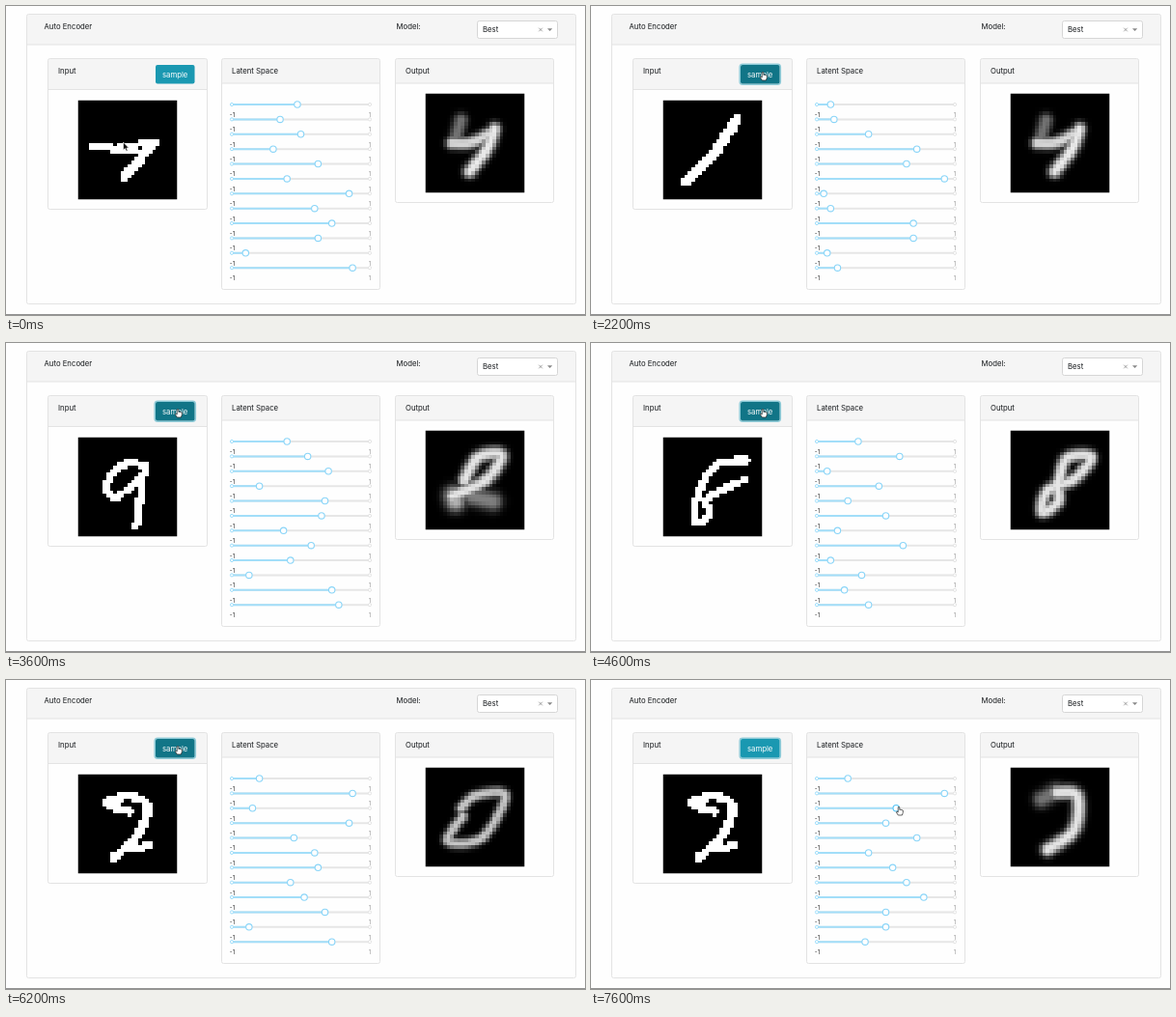
An HTML page with a canvas that plays this animation: 600 by 320 pixels, repeating every 8000 ms.

```html
<!DOCTYPE html>
<html lang="en">
<head>
<meta charset="utf-8">
<title>Auto Encoder</title>
<style>
  html, body { margin: 0; width: 100%; height: 100%; overflow: hidden; background: #fefefe; }
  svg { position: absolute; left: 0; top: 0; }
  canvas { position: absolute; left: 0; top: 0; width: 102.5px; height: 102.5px; image-rendering: pixelated; }
  #input { transform: translate(74.5px, 97.5px); }
  #output { transform: translate(434.5px, 90.5px); }
  text { font: 7.75px Inter, "Liberation Sans", sans-serif; fill: #15181b; }
  .mark { font-size: 6.2px; text-anchor: middle; fill: #333; }
</style>
</head>
<body>
<svg id="page" width="600" height="320"></svg>
<canvas id="input" width="28" height="28"></canvas>
<canvas id="output" width="28" height="28"></canvas>
<svg id="pointer" width="600" height="320"></svg>
<script>
const LOOP = 8000, TICK = 200, SIZE = 28;
const RAIL = { left: 234, width: 143, top: 102, gap: 15.38, count: 12, steps: 40 };
const BORDER = '#e3e3e3', BLUE = '#96dbfa';
const $ = id => document.getElementById(id);

function add(parent, tag, attrs, text) {
  const node = document.createElementNS('http://www.w3.org/2000/svg', tag);
  for (const key in attrs) node.setAttribute(key, attrs[key]);
  if (text) node.textContent = text;
  return parent.appendChild(node);
}

// Smooth curve through a few key points given as x, y pairs in cells.
function stroke(width, light, ...xy) {
  const keys = [];
  for (let i = 0; i < xy.length; i += 2) keys.push([xy[i], xy[i + 1]]);
  const key = i => keys[Math.max(0, Math.min(keys.length - 1, i))];
  const points = [];
  for (let u = 0; u <= keys.length - 1; u += 1 / 16) {
    const i = Math.floor(u), f = u - i;
    points.push([0, 1].map(axis => {
      const [a, b, c, d] = [-1, 0, 1, 2].map(k => key(i + k)[axis]);
      return b + f / 2 * (c - a + f * (2 * a - 5 * b + 4 * c - d + f * (3 * (b - c) + d - a)));
    }));
  }
  return { width, light, points };
}

const drawn = {
  seven: [stroke(1.05, 1, 4, 13, 9, 13), stroke(1.05, 1, 10, 14, 16, 14),
    stroke(1.05, 1, 12, 13, 22, 12), stroke(1.4, 1, 20.5, 13, 17, 17.3, 13.1, 21.8)],
  one: [stroke(1.5, .95, 20.8, 5.4, 14, 15.4, 6.6, 22.6)],
  nine: [stroke(1.05, .9, 18.5, 8, 13.5, 7.3, 7.8, 13.5, 11, 16.6, 18.3, 11),
    stroke(1.1, .9, 18.8, 8, 17.8, 16, 16.4, 25)],
  eight: [stroke(1.1, 1, 24, 6.5, 15, 7.7, 10, 16, 9.2, 23.7, 12.8, 22, 12, 17.5),
    stroke(1.1, 1, 23, 12, 12.5, 17)],
  two: [stroke(1.25, 1, 14.5, 10.5, 8.4, 8.3, 14, 6.1, 19.5, 9, 17, 17, 10, 23.6),
    stroke(1.05, 1, 10, 23.5, 13, 21.5, 20, 20.3)]
};

const decoded = {
  seven: [stroke(1.6, .45, 10, 7.5, 8.5, 13), stroke(1.4, .85, 7.5, 14, 13, 13.8, 19.5, 10.5),
    stroke(1.5, .92, 19.5, 10, 17.5, 15.5, 12.5, 22)],
  wideTwo: [stroke(1.5, .9, 11, 14, 15, 7.5, 21.5, 7, 17, 14, 7.5, 18.5),
    stroke(2.6, .7, 8, 18.5, 8.5, 20), stroke(2.4, .5, 13, 18.5, 19, 20)],
  eight: [stroke(1.4, .9, 13.5, 15, 16, 7.8, 22.8, 7.5, 18, 13.7, 10.5, 17, 9, 23, 13.5, 20, 13, 15)],
  zero: [stroke(1.1, .78, 10, 11.5, 14.5, 7.8, 22.5, 8, 16, 19.8, 6.3, 20.8, 10.5, 13.8)],
  two: [stroke(1.6, .9, 13, 7, 18.8, 8, 18, 17.5, 10.5, 23.2), stroke(2.1, .45, 8.8, 9, 13, 6.7)]
};

// Knob settings in rail steps; any other digit gets a seeded random row.
const settings = {
  seven: [19, 14, 20, 12, 25, 16, 34, 24, 29, 25, 4, 35],
  one: [4, 5, 15, 29, 26, 37, 2, 4, 28, 28, 3, 6],
  wideTwo: [16, 22, 28, 8, 27, 26, 15, 23, 17, 5, 29, 31],
  eight: [12, 24, 3, 18, 9, 20, 6, 25, 4, 13, 8, 15],
  zero: [8, 35, 6, 34, 18, 24, 25, 17, 21, 27, 5, 29],
  two: [9, 37, 23, 20, 29, 15, 22, 26, 31, 20, 20, 14]
};
const randomStep = i => 4 + Math.floor(32 * Math.abs(Math.sin(78.233 * (i + 1))));
const knobStep = (name, i) => settings[name] ? settings[name][i] : randomStep(i);

// The sliders follow each new input after the lag, the output after twice the lag.
const samples = [
  { start: 0, name: 'seven', lag: 0 }, { start: 2000, name: 'one', lag: 200 },
  { start: 3000, name: 'wideTwo', lag: 0 }, { start: 3400, name: 'nine', lag: 400 },
  { start: 4600, name: 'eight', lag: 0 }, { start: 5000, name: 'zero', lag: 200 },
  { start: 6000, name: 'two', lag: 400 }
];
const digitAt = (t, lags) => samples.filter(s => s.start + lags * s.lag <= t).pop().name;

function shade(strokes, x, y, soft) {
  return Math.max(...strokes.map(({ width, light, points }) => {
    const d = Math.min(...points.map(p => Math.hypot(x - p[0], y - p[1])));
    return soft ? light * Math.exp(-((d / (width + .4)) ** 2.5)) : +(light > .75 && d < width);
  }));
}

function paint(canvas, name, strokes, soft) {
  if (canvas.dataset.digit === name) return;
  canvas.dataset.digit = name;
  const ctx = canvas.getContext('2d');
  for (let y = 0; y < SIZE; y++)
    for (let x = 0; x < SIZE; x++) {
      const v = Math.round(255 * shade(strokes, x + .5, y + .5, soft));
      ctx.fillStyle = `rgb(${v},${v},${v})`;
      ctx.fillRect(x, y, 1, 1);
    }
}

const page = $('page');

function card(x, y, width, height, head, title, inset) {
  add(page, 'rect', { x, y, width, height: head, rx: 2, fill: '#f5f5f5' });
  add(page, 'path', { d: `M${x} ${y + head}h${width}`, stroke: BORDER });
  add(page, 'rect', { x, y, width, height, rx: 2, fill: 'none', stroke: BORDER });
  add(page, 'text', { x: x + inset, y: y + 15.5 }, title);
}

card(21.5, 8.5, 569, 300, 31.5, 'Auto Encoder', 18);
card(43.5, 54.5, 165, 156, 32, 'Input', 10.5);
card(223.5, 54.5, 164, 239, 25.5, 'Latent Space', 10.5);
card(403.5, 54.5, 164, 149, 25.5, 'Output', 10.5);
add(page, 'path', { d: 'M0 319.5H600', stroke: '#929292' });

add(page, 'text', { x: 404.5, y: 24 }, 'Model:');
add(page, 'rect', { x: 488.5, y: 15.5, width: 83, height: 18, rx: 2, fill: '#fff', stroke: '#d6d6d6' });
add(page, 'text', { x: 494, y: 27.3 }, 'Best');
add(page, 'path', { d: 'M552.2 22.7l3.6 3.6m0-3.6l-3.6 3.6', stroke: '#888', 'stroke-width': .8 });
add(page, 'path', { d: 'M561 23.3h5.2l-2.6 2.7z', fill: '#888' });

const ring = add(page, 'rect', { x: 154.2, y: 60.2, width: 42.1, height: 21.1, rx: 3, fill: 'none', stroke: '#8fcbd8', 'stroke-width': 1.6 });
const button = add(page, 'rect', { x: 155, y: 61, width: 40.5, height: 19.5, rx: 2 });
add(page, 'text', { x: 175.2, y: 73.6, 'text-anchor': 'middle', style: 'fill:#fff' }, 'sample');

const sliders = Array.from({ length: RAIL.count }, (_, i) => {
  const y = RAIL.top + i * RAIL.gap, right = RAIL.left + RAIL.width;
  const dot = (cx, color) => add(page, 'circle', { cx, cy: y, r: 1.6, fill: '#fff', stroke: color, 'stroke-width': .9 });
  const mark = (x, label, fill) => add(page, 'text', { class: 'mark', x, y: y + 12.9, style: `fill:${fill}` }, label);
  add(page, 'path', { d: `M${RAIL.left} ${y}H${right}`, stroke: '#e6e6e6', 'stroke-width': 2 });
  const fill = add(page, 'path', { stroke: '#a2def9', 'stroke-width': 2 });
  dot(RAIL.left, BLUE);
  dot(right, '#e0e0e0');
  mark(RAIL.left + .5, '-1', '#333');
  mark(right, '1', '#999');
  const knob = add(page, 'circle', { cy: y, r: 3.2, fill: '#fff', 'stroke-width': 1.1 });
  return { y, fill, knob };
});

const arrow = add($('pointer'), 'path', {
  d: 'M0 0V8.2L1.9 6.5L3.2 9.3L4.6 8.7L3.4 6H5.8Z', fill: '#111', stroke: '#fff', 'stroke-width': .6
});
const hand = add($('pointer'), 'path', {
  d: 'M-.8 5V.8Q0-.4.8.8V3.4L2 3.2L3.1 3.6L4.3 4V6.3L3.4 9H-.7L-2.7 5.9Q-2.6 4.6-.8 6Z',
  fill: '#fff', stroke: '#222', 'stroke-width': .7
});

const bend = (a, b, c, u) => a.map((v, i) => v * (1 - u) ** 2 + 2 * b[i] * u * (1 - u) + c[i] * u * u);

function pointerAt(t) {
  if (t < 1600) return bend([121.5, 141], [213, 50], [173, 76], Math.min(1, t / 1200));
  if (t < 7000) return [178, 68];
  return bend([168, 71], [235, 112], [319, 131], Math.min(1, (t - 7000) / 600));
}

function draw(t) {
  const seen = digitAt(t, 0), made = digitAt(t, 2), latent = digitAt(t, 1);
  paint($('input'), seen, drawn[seen] || decoded[seen], false);
  paint($('output'), made, decoded[made] || drawn[made], true);

  const hovered = t >= 1600 && t < 7000, onKnob = t >= 7600;
  sliders.forEach(({ y, fill, knob }, i) => {
    const x = RAIL.left + knobStep(latent, i) * RAIL.width / RAIL.steps;
    fill.setAttribute('d', `M${RAIL.left} ${y}H${x}`);
    knob.setAttribute('cx', x);
    knob.setAttribute('stroke', onKnob && i === 2 ? '#57c5f7' : '#8ad5f8');
  });
  button.setAttribute('fill', hovered ? '#117587' : '#1a98b1');
  ring.setAttribute('visibility', t >= 1800 ? 'visible' : 'hidden');

  const isHand = hovered || onKnob;
  for (const [node, shown] of [[arrow, !isHand], [hand, isHand]]) {
    node.setAttribute('transform', `translate(${pointerAt(t).join(' ')})`);
    node.setAttribute('visibility', shown ? 'visible' : 'hidden');
  }
}

const start = performance.now();
function frame() {
  const t = (performance.now() - start) % LOOP;
  draw(Math.floor(t / TICK) * TICK);
  requestAnimationFrame(frame);
}
frame();
</script>
</body>
</html>
```
